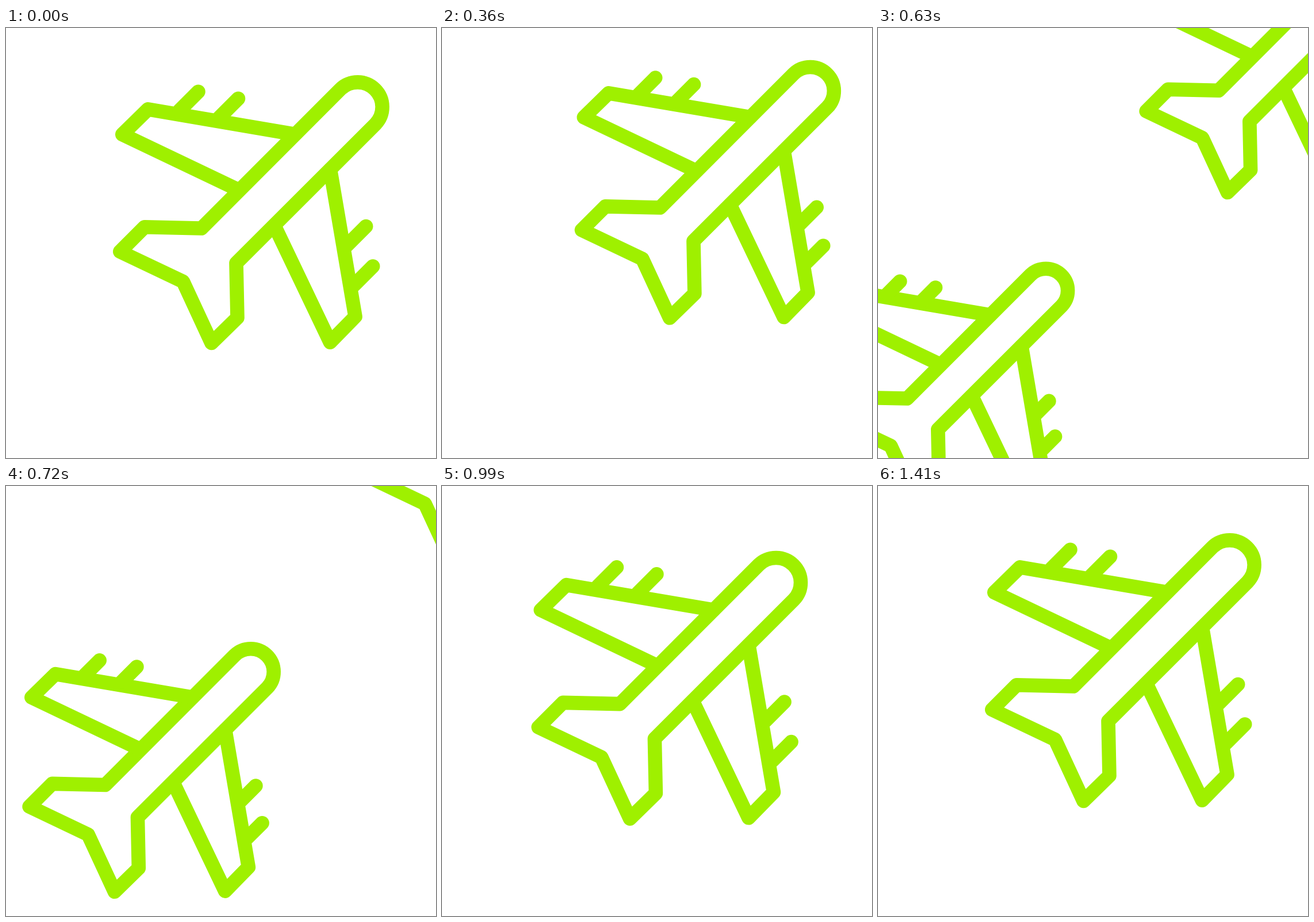
An HTML page with a canvas that plays this animation: 748 px wide and 748 px high, repeating every 1.5 s.

```html
<!DOCTYPE html>
<html>
<head>
<meta charset="utf-8">
<style>
html, body { margin: 0; width: 100%; height: 100%; overflow: hidden; background: #fff; }
canvas { display: block; }
</style>
</head>
<body>
<canvas id="stage" width="748" height="748"></canvas>
<script>
const ctx = document.getElementById('stage').getContext('2d');
const LOOP = 1500, STEP = 30, SIZE = 748, MID = SIZE / 2, STROKE = 24.6;
const TURN = 660, BRAKE = 630, STOP = 1410, SHRINK = 0.113;

const body = new Path2D(
  'M340 348.5L581.8 106.4A43 43 0 0 1 642.6 167.2L400.5 409' +
  'L402.5 504L357.5 548L308 441.2L198.3 389L241 346.3Z');
const wing = new Path2D('M503 185L247 141.4L202.3 185.1L405.5 282.2');

function smooth(u) {
  u = Math.min(1, Math.max(0, u));
  return u * u * (3 - 2 * u);
}

// Shrinks slowly, then springs back.
function zoomAt(t) {
  return 1 - SHRINK * (smooth((t / TURN) ** 1.55) - smooth((t - TURN) / 140));
}

// Accelerates away from rest.
function leaveAt(t) {
  return t < 120 ? 0 : 280 * (t / BRAKE) ** 3.5;
}

// Flies in at constant speed, then decays to rest.
function arriveAt(t) {
  const dt = t - BRAKE;
  if (dt < 0) return -330 + 2.15 * dt;
  const u = Math.min(1, dt / (STOP - BRAKE));
  return -330 * Math.exp(-0.0066 * dt) * (1 - u ** 8);
}

function drawWing(retract) {
  ctx.stroke(wing);
  ctx.beginPath();
  for (const [x, y] of [[334.5, 110.8], [404, 122.8]]) {
    ctx.moveTo(x - retract, y + retract);
    ctx.lineTo(x - 33, y + 33);
  }
  ctx.stroke();
}

function drawPlane(dx, dy, zoom) {
  const retract = 75 * (1 - zoom);
  ctx.save();
  ctx.translate(MID, MID);
  ctx.scale(zoom, zoom);
  ctx.translate(dx - MID, dy - MID);
  ctx.lineWidth = STROKE / zoom;
  ctx.stroke(body);
  drawWing(retract);
  ctx.transform(0, -1, -1, 0, 749, 749); // mirror across the fuselage
  drawWing(retract);
  ctx.restore();
}

function render(now) {
  const t = Math.floor(now % LOOP / STEP) * STEP;
  const zoom = zoomAt(t), leave = leaveAt(t), arrive = arriveAt(t);
  ctx.fillStyle = '#fff';
  ctx.fillRect(0, 0, SIZE, SIZE);
  ctx.strokeStyle = '#9ff000';
  ctx.lineCap = ctx.lineJoin = 'round';
  drawPlane(leave, -0.975 * leave, zoom);
  drawPlane(arrive, -arrive, zoom);
}

const start = performance.now();
function tick() {
  render(performance.now() - start);
  requestAnimationFrame(tick);
}
tick();
</script>
</body>
</html>
```
